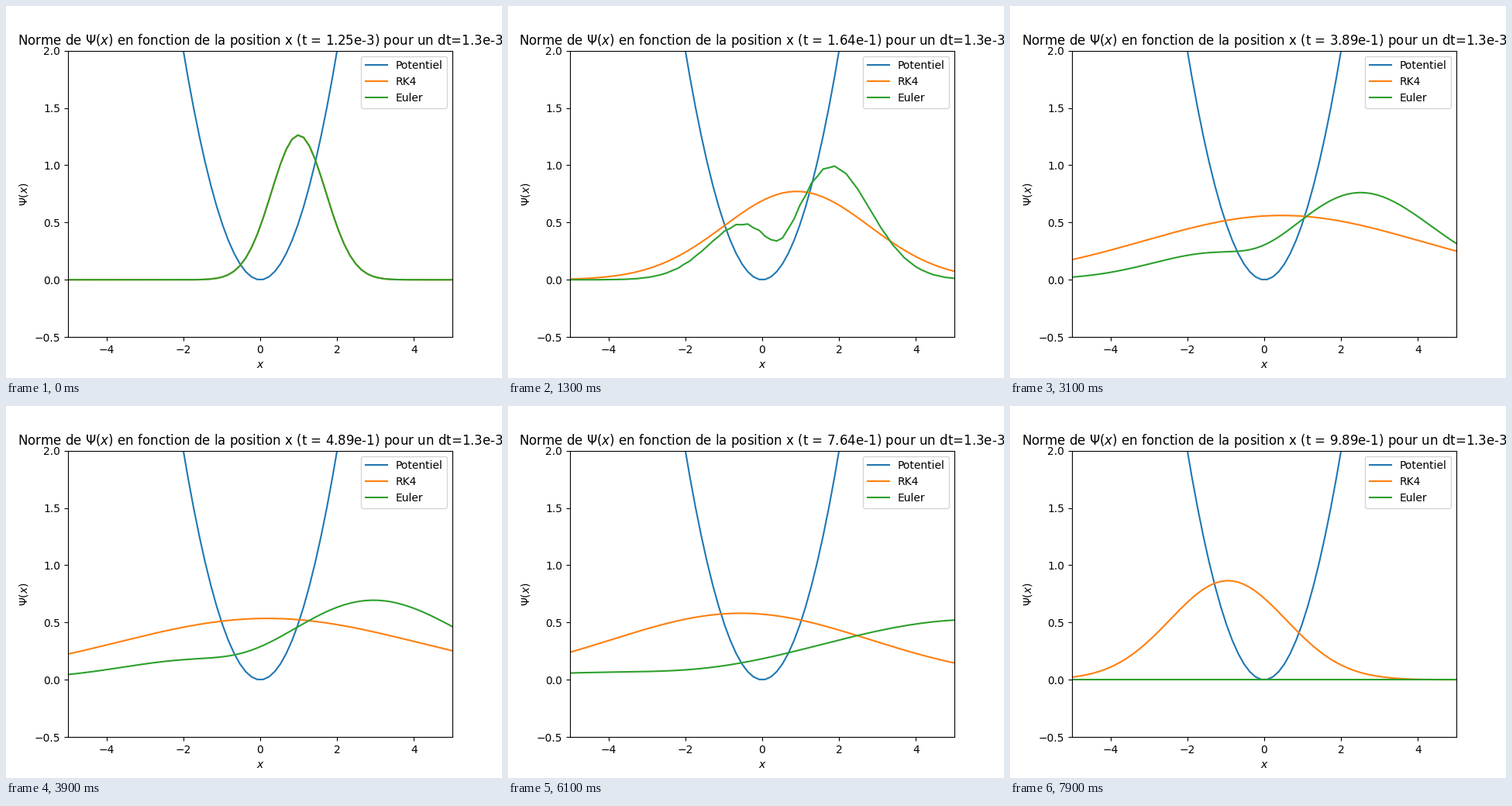
A matplotlib script for the animation above (8000 ms loop, 640 by 480 pixels).

```python
import numpy as np
import matplotlib.pyplot as plt
from matplotlib.animation import FuncAnimation

FRAMES, INTERVAL = 80, 100
DT = 1.25e-3
STEPS = 10
OMEGA = np.sqrt(8)

# Explicit Euler amplifies grid-scale round-off until it hides the packet
Z = 0.84                            # dt times the highest kinetic energy
MU = (Z - 1j) / (1 + Z * Z)         # complex rate of the unstable envelope
GROWTH, TAKEOVER = 1.33, 115        # gain per step, step where noise wins
LAG = 0.015
SEED_X, SEED_TILT = 0.81, -0.59 - 0.09j
OVERFLOW = 0.85                     # time at which the scheme collapses to zero

x = np.linspace(-15, 15, 200)
dx = x[1] - x[0]
ripple = (-1.0) ** np.arange(x.size)


def normalise(psi):
    return psi * np.sqrt(2 / (np.sum(np.abs(psi) ** 2) * dx))


def rk4_norm(t):
    """Breathing Gaussian swinging in the harmonic well."""
    c, s = np.cos(OMEGA * t), np.sin(OMEGA * t)
    var = 0.25 * c * c + 8 * s * s
    return normalise(np.exp(-(x - c) ** 2 / (4 * var)))


def noise_envelope(t):
    """Envelope of the unstable mode, grown from a tilted point seed."""
    phi = OMEGA * MU * max(t - LAG, 0.01)
    spread = OMEGA * np.sin(phi)
    node = SEED_X * np.cos(phi) + spread * SEED_TILT
    power = (x * SEED_X - x ** 2 * np.cos(phi) / 2) / spread
    return normalise((x - node) * np.exp(power - power.real.max()))


def euler_norm(step):
    t = step * DT
    if t > OVERFLOW:
        return np.zeros_like(x)
    noise = GROWTH ** (step - TAKEOVER) * ripple * noise_envelope(t)
    return np.abs(normalise(rk4_norm(t) + noise))


def sci(value, digits):
    return np.format_float_scientific(value, precision=digits, exp_digits=1)


fig, ax = plt.subplots(figsize=(6.4, 4.8), dpi=100)
ax.plot(x, x ** 2 / 2, label="Potentiel")
rk4, = ax.plot(x, rk4_norm(DT), label="RK4")
euler, = ax.plot(x, euler_norm(1), label="Euler")
ax.set_xlim(-5, 5)
ax.set_ylim(-0.5, 2)
ax.set_xlabel("$x$")
ax.set_ylabel(r"$\Psi(x)$")
ax.legend(loc="upper right")


def update(i):
    step = 1 + STEPS * i
    rk4.set_ydata(rk4_norm(step * DT))
    euler.set_ydata(euler_norm(step))
    ax.set_title(r"Norme de $\Psi(x)$ en fonction de la position x "
                 f"(t = {sci(step * DT, 2)}) pour un dt={sci(DT, 1)}", pad=5.28)
    return rk4, euler


anim = FuncAnimation(fig, update, frames=FRAMES, interval=INTERVAL,
                     repeat=True, repeat_delay=0)
plt.show()
```
